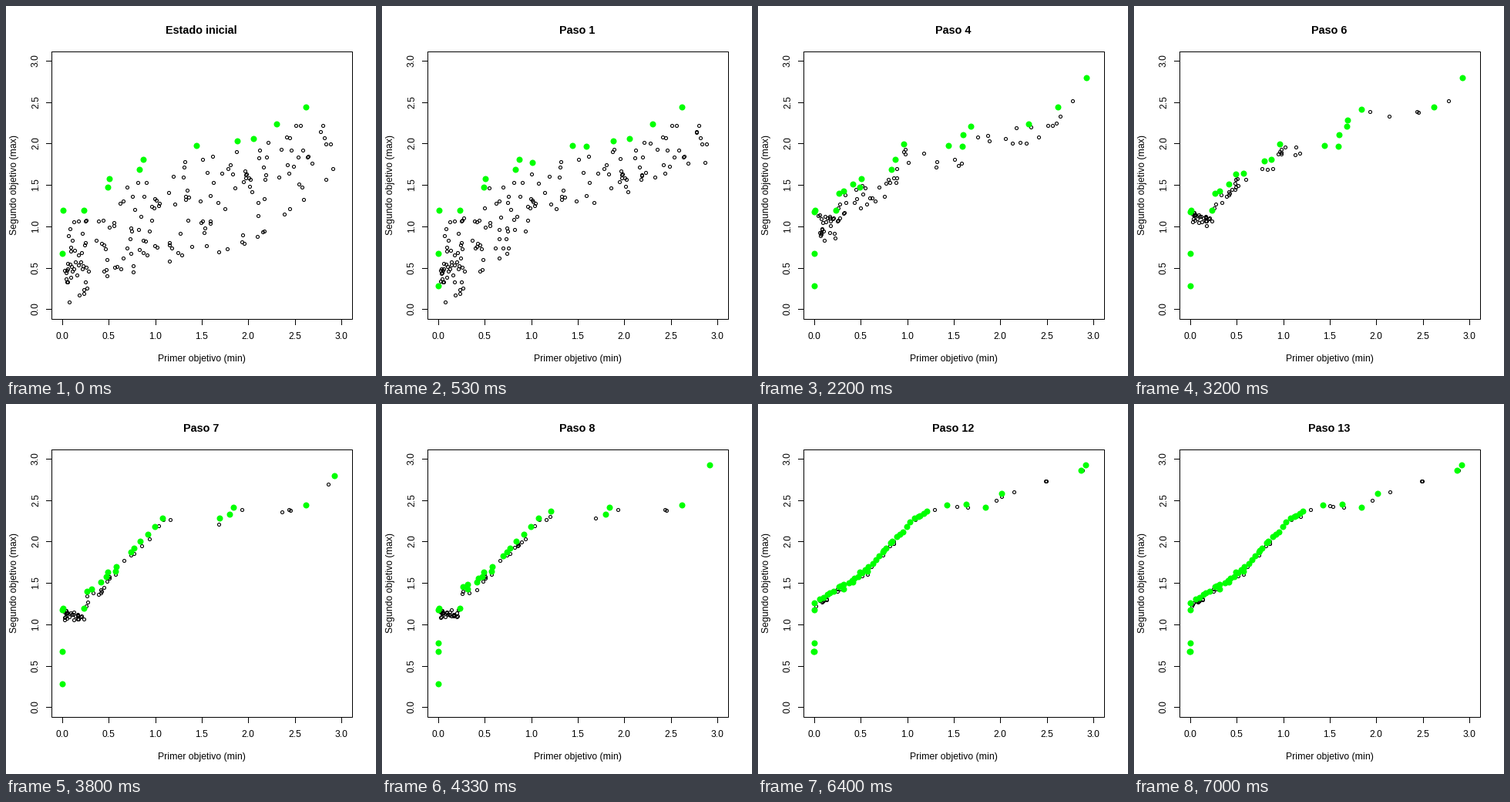
Recreate the animation shown at these times as a matplotlib script. Size 480 by 480 pixels, loop 7470 ms.

```python
import matplotlib.pyplot as plt
import numpy as np
from matplotlib.animation import FuncAnimation

SIZE, DPI = 480, 100
PT = 72 / DPI                  # points per pixel
FRAMES, INTERVAL = 249, 30     # 7470 ms
STEP_MS = 1600 / 3
LAST = 13
TOLERANCE = 4

plt.rcParams["font.family"] = "Liberation Sans"
rng = np.random.default_rng(11)

# Best solutions in pixels, by the step in which they are found.
ELITE = {
    0: [(72.7, 321), (74, 265), (101, 265), (132, 235), (134, 224),
        (173, 212), (178, 199), (247, 181), (300, 175), (321, 172),
        (351, 153), (389, 131)],
    1: [(72.6, 363), (195, 203), (265, 182)],
    3: [(105, 243), (123, 231)],
    4: [(72.9, 267), (111, 240), (189, 179), (266, 167), (276, 156),
        (426, 93)],
    5: [(132, 218), (142, 217), (169, 201), (277, 148), (295, 134)],
    7: [(162, 192), (176, 193), (212, 168), (290, 143)],
    8: [(72.8, 310), (425, 79)],
    9: [(72.5, 321), (245, 131), (316, 116)],
    10: [(72.95, 258)],
    11: [(419, 86)],
    12: [(270, 130)],
}
RIDGE_X = [81, 101, 127, 151, 171, 188, 198, 220]
RIDGE_Y = [254, 240, 226, 205, 181, 165, 152, 139]
FLOOR_X = [73, 120, 180, 290, 345, 430]
FLOOR_Y = [392, 370, 344, 318, 300, 212]


def found():
    """All best solutions as rows of x, y, step."""
    rows = [(x, y, step) for step, pts in ELITE.items() for x, y in pts]
    for x in np.linspace(81, 220, 32) + rng.uniform(-1.5, 1.5, 32):
        y = np.interp(x, RIDGE_X, RIDGE_Y) + rng.uniform(-1, 1)
        rows.append((x, y, rng.integers(7, 12)))
    return np.array(sorted(rows))


def beaten(points):
    """True where another point is further left and clearly higher."""
    x, y = points[:, 0], points[:, 1]
    left = x[None, :] <= x[:, None]
    above = y[None, :] < y[:, None] - TOLERANCE
    return (left & above).any(axis=1)


def reach(step):
    """How far below the front a solution still survives."""
    return 145 * np.exp(-0.4 * step) + 4 if step else np.inf


def first_cloud(front, n=185):
    x = 75 + 350 * rng.random(n) ** 1.35
    top = np.interp(x, front[:, 0], front[:, 1])
    floor = np.interp(x, FLOOR_X, FLOOR_Y)
    y = top + (floor - top) * rng.uniform(0.1, 1, n)
    return np.column_stack([x, y])


def offspring(front, step):
    n = int(45 * np.exp(-0.15 * step))
    x = 75 + 350 * rng.random(n) ** (1.2 + 0.15 * step)
    y = np.interp(x, front[:, 0], front[:, 1])
    return np.column_stack([x, y + reach(step) * rng.uniform(0.1, 1, n)])


def evolve():
    """Yield the front and the rest of the population for every step."""
    elite = found()
    crowd = None
    for step in range(LAST + 1):
        known = elite[elite[:, 2] <= step, :2]
        lost = beaten(known)
        front = known[~lost]
        if step:
            crowd = np.vstack([crowd, offspring(front, step)])
        else:
            crowd = first_cloud(front)
        gap = crowd[:, 1] - np.interp(crowd[:, 0], front[:, 0], front[:, 1])
        spread = np.interp(crowd[:, 0], [73, 300], [1.25, 0.75])
        crowd = crowd[gap < reach(step) * spread]
        past = known[lost]
        gap = past[:, 1] - np.interp(past[:, 0], front[:, 0], front[:, 1])
        rest = np.vstack([crowd, past[gap < reach(step)]])
        yield np.round(front), np.round(rest)


STEPS = list(evolve())

fig = plt.figure(figsize=(SIZE / DPI, SIZE / DPI), dpi=DPI, facecolor="white")
ax = fig.add_axes([0, 0, 1, 1])
ax.set_xlim(0.5, SIZE + 0.5)
ax.set_ylim(SIZE + 0.5, 0.5)
ax.axis("off")


def line(xs, ys):
    ax.plot(xs, ys, color="black", lw=PT, solid_capstyle="projecting",
            solid_joinstyle="miter")


def label(x, y, text, px=12, **kw):
    return ax.text(x, y, text, fontsize=px * PT, ha="center", va="baseline",
                   rotation_mode="anchor", **kw)


line([59, 449, 449, 59, 59], [59, 59, 406, 406, 59])
for k in range(7):
    x, y = round(73 + 60.33 * k), round(393.3 - 53.7 * k)
    line([x, x], [406, 413])
    line([59, 52], [y, y])
    label(x, 433, f"{k / 2:.1f}")
    label(42.5, y, f"{k / 2:.1f}", rotation=90)
label(254, 462, "Primer objetivo (min)", 12.3)
label(14.5, 232.5, "Segundo objetivo (max)", 12.3, rotation=90)
title = label(254, 37, "", 14.4, weight="bold")

rings, = ax.plot([], [], "o", ms=4 * PT, mfc="none", mec="black", mew=1.1 * PT)
dots, = ax.plot([], [], "o", ms=8 * PT, color="#00ff00", mew=0, zorder=5,
                antialiased=False)


def update(frame):
    t = frame * INTERVAL + INTERVAL - 1
    step = min(LAST, int(t / STEP_MS))
    front, rest = STEPS[step]
    title.set_text(f"Paso {step}" if step else "Estado inicial")
    rings.set_data(rest[:, 0], rest[:, 1])
    dots.set_data(front[:, 0], front[:, 1])
    return rings, dots, title


anim = FuncAnimation(fig, update, frames=FRAMES, interval=INTERVAL,
                     repeat=True, repeat_delay=0)
plt.show()
```
